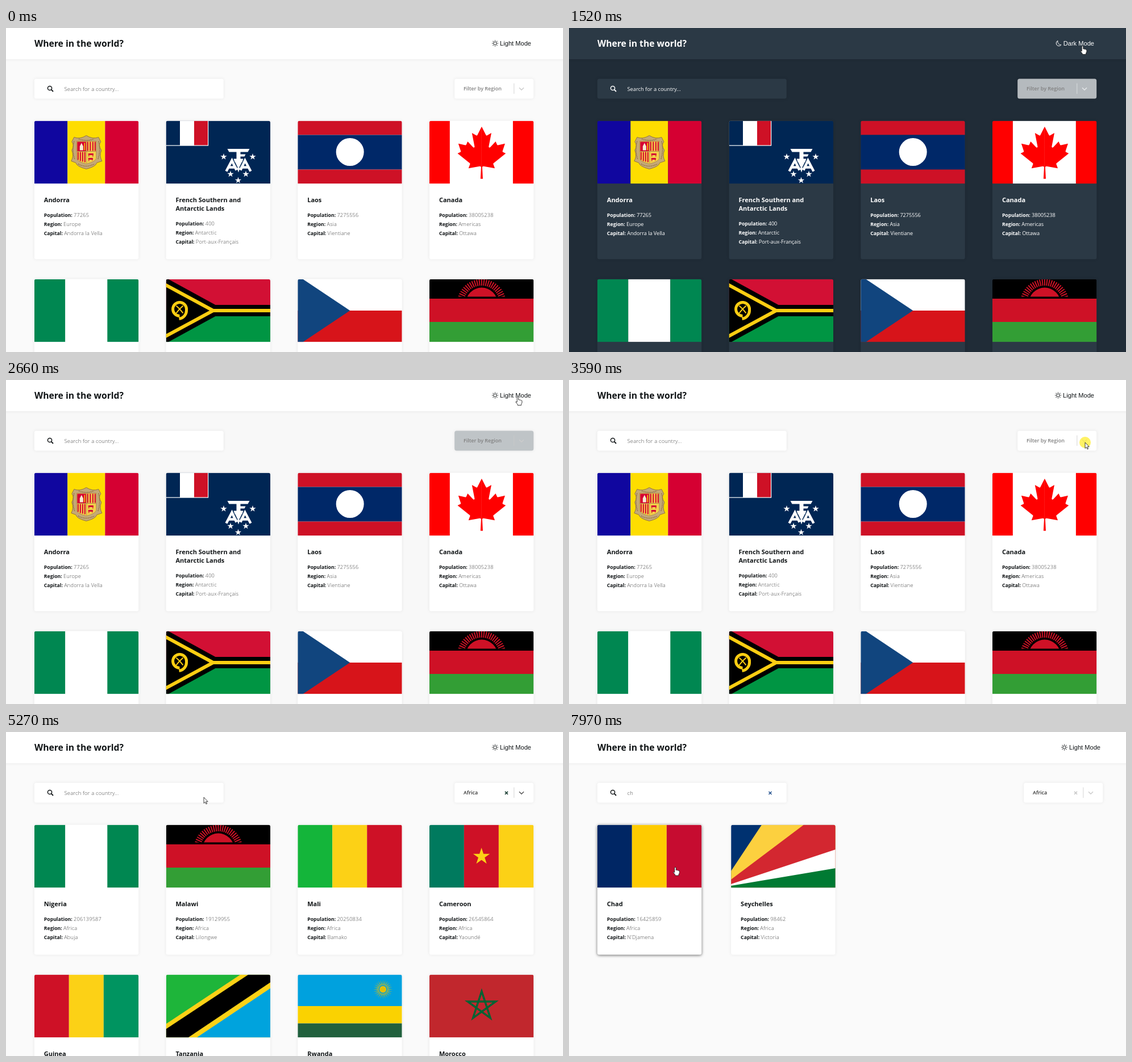
An HTML page that plays this animation: 980 px wide and 571 px high, repeating every 8000 ms.

```html
<!DOCTYPE html>
<html lang="en">
<head>
<meta charset="utf-8">
<title>Where in the world?</title>
<style>
html, body { margin: 0; width: 100%; height: 100%; overflow: hidden; }
svg { display: block; width: 980px; height: 571px; font-family: "Open Sans", "Noto Sans", sans-serif; }
#stage { --bg: #fafafa; --panel: #fff; --ink: #111517; --soft: #484848; --line: #ccc; --glow: rgba(0,0,0,.08); --thin: 300; --gap: .2px; }
#stage.dark { --bg: #202c37; --panel: #2b3945; --ink: #fff; --soft: #fff; --line: #e4e7e9; --glow: rgba(0,0,0,.12); --thin: 400; --gap: -.05px; }
text { fill: var(--ink); white-space: pre; }
.panel { fill: var(--panel); filter: drop-shadow(0 0 2.5px var(--glow)); }
.hover .panel { filter: drop-shadow(0 1px 2.5px rgba(0,0,0,.6)); }
.title { font-size: 15.7px; font-weight: 700; }
.name { font-size: 11px; font-weight: 700; }
.fact { font-size: 8.7px; font-weight: 700; }
.value, .field { font-weight: var(--thin); letter-spacing: var(--gap); fill: var(--soft); }
.value { font-size: 9.2px; }
.field { font-size: 9.4px; }
.mode { font: 11.1px "Liberation Sans", Arial, sans-serif; }
.pick { font-size: 9px; font-weight: 600; }
.stroke { fill: none; stroke: var(--ink); }
</style>
</head>
<body>
<svg id="stage" viewBox="0 0 980 571"></svg>
<script>
const LOOP = 8000, W = 183.5, H = 111;
const stage = document.getElementById('stage');

// Shape helpers
const rect = (x, y, w, h, fill) => `<rect x="${x}" y="${y}" width="${w}" height="${h}" fill="${fill}"/>`;
const disc = (x, y, r, fill) => `<circle cx="${x}" cy="${y}" r="${r}" fill="${fill}"/>`;
const poly = (points, fill) => `<polygon points="${points}" fill="${fill}"/>`;
const path = (d, fill) => `<path d="${d}" fill="${fill}"/>`;
const line = (d, color, width, extra = '') =>
  `<path d="${d}" fill="none" stroke="${color}" stroke-width="${width}" ${extra}/>`;
const times = (n, f) => Array.from({ length: n }, (_, i) => f(i)).join('');
const around = (cx, cy, r, turn) => {
  const a = (turn - .25) * 2 * Math.PI;
  return (cx + r * Math.cos(a)).toFixed(2) + ',' + (cy + r * Math.sin(a)).toFixed(2);
};
const star = (cx, cy, r, fill) =>
  poly(times(10, i => around(cx, cy, i % 2 ? r * .382 : r, i / 10) + ' '), fill);

// Bands take pairs of start and colour
const bands = (wide, ...list) => {
  let out = '';
  for (let i = 0; i < list.length; i += 2) {
    const at = list[i], len = (list[i + 2] ?? (wide ? W : H)) - at;
    out += wide ? rect(at, 0, len, H, list[i + 1]) : rect(0, at, W, len, list[i + 1]);
  }
  return out;
};
const pales = (...l) => bands(true, ...l);
const bars = (...l) => bands(false, ...l);

const unionJack = () => `<svg x="-19" width="111" height="55.5">` + rect(0, 0, 111, 55.5, '#012169') +
  line('M0 0L111 55.5M111 0L0 55.5', '#fff', 11) +
  line('M0 2.5L53 29M58 26.5L111 53M111 -2L58 24.5M53 31L0 57.5', '#c8102e', 3.7) +
  line('M55.5 0V56M0 27.75H111', '#fff', 18) + line('M55.5 0V56M0 27.75H111', '#c8102e', 11) + '</svg>';

const LEAF = 'M0 4430H90l-45-863a95 95 0 0 1 111-98l859 151-116-320a65 65 0 0 1 20-73l941-762-212-99a65 65 0 0 1-34-79l186-572-542 115a65 65 0 0 1-73-38l-105-247-423 454a65 65 0 0 1-111-57l204-1052-327 189a65 65 0 0 1-91-27L0 400Z';

const flags = {
  andorra: () => pales(0, '#10069f', 58.5, '#fedd00', 124.5, '#d50032') +
    `<g stroke="#8c6d3f" stroke-width=".9">` +
    path('M70 29Q80 33 91.5 26Q103 33 113 29L117 37Q112 43 118 52Q114 62 119 71L110 74Q108 81 91.5 85Q75 81 73 74L65 71Q70 62 66 52Q71 43 66 37Z', '#c5a976') + '</g>' +
    line('M70 36Q66 52 71 68M113 36Q117 52 112 68M77 76Q91 84 106 76M78 32Q92 37 105 32', '#94754a', 1.6, 'stroke-dasharray="2 1"') +
    path('M74.5 36H109V66Q108 72 91.7 76Q75 72 74.5 66Z', '#f3d04a') +
    rect(75.5, 37, 15.5, 16.5, '#d50032') + path('M80 52V45L83 39L86 45V52Z', '#f6ead0') + line('M88.5 39V52', '#fedd00', 1.5) +
    line('M94 37V53M98.5 37V53M103 37V53M107 37V53M77 55V69M81 55V71M85 55V72M89 55V73', '#d50032', 2) +
    line('M95 59H104M95 67H103', '#d50032', 3) + line('M96 60V63M103 60V63M96 68V71M102 68V70', '#d50032', 1.2) +
    line('M74.5 36H109V66Q108 72 91.7 76Q75 72 74.5 66ZM92 36V75M75 54H109', '#a8804c', .8),
  southern: () => rect(0, 0, W, H, '#002654') + rect(0, 0, 74.7, 44.2, '#fff') +
    rect(0, 0, 24.5, 43, '#002654') + rect(49.5, 0, 24, 43, '#ce1126') +
    path('M108 49.5H147L144 55H131V59H140L138 63H131V70H124V55H111Z', '#fff') +
    line('M106 89L116 70L124 87M149 89L139 70L131 87M110 82H121M134 82H145', '#fff', 4.4) +
    poly('119,67 136,67 127.5,91', '#fff') + line('M121 73L126 83M134 73L129 83', '#002654', 1.2) +
    [[101.5, 63.5], [152.5, 63.5], [113.5, 94], [140.5, 94], [127, 105]].map(p => star(...p, 6, '#fff')).join(''),
  laos: () => bars(0, '#ce1126', 25, '#002868', 86, '#ce1126') + disc(92, 55, 24.5, '#fff'),
  canada: () => pales(0, '#f00', 36, '#fff', 147, '#f00') +
    [1, -1].map(s => `<path d="${LEAF}" fill="#f00" transform="translate(92 1.2) scale(${s * .0228} .0228)"/>`).join(''),
  nigeria: () => pales(0, '#008751', 54.5, '#fff', 128.5, '#008751'),
  vanuatu: () => bars(0, '#d21034', 55.5, '#009543') +
    poly('0,0 4,0 87,45.5 184,45.5 184,65.5 87,65.5 4,111 0,111', '#000') +
    line('M-4 8.5L83 55.5L-4 102.5M83 55.5H184', '#fdce12', 6) +
    line('M23 70A15 15 0 0 0 36 54A12 12 0 1 0 24 65', '#fdce12', 5) +
    line('M18 47Q24 52 30 60M30 47Q24 52 18 60', '#fdce12', 2),
  czechia: () => bars(0, '#fff', 55.5, '#d7141a') + poly('0,0 9,0 92,55.5 9,111 0,111', '#11457e'),
  malawi: () => bars(0, '#000', 34.5, '#ce1126', 75.5, '#339e35') +
    `<svg width="${W}" height="31">` + disc(92, 43, 28, '#ce1126') +
    times(61, i => line(`M${around(92, 43, 31.5, i / 60 - .5)}L${around(92, 43, 43, i / 60 - .5)}`, '#ce1126', 2)) + '</svg>',
  mali: () => pales(0, '#14b53a', 61, '#fcd116', 122, '#ce1126'),
  cameroon: () => pales(0, '#007a5e', 61, '#ce1126', 122, '#fcd116') + star(91.7, 56, 15.5, '#fcd116'),
  guinea: () => pales(0, '#ce1126', 61, '#fcd116', 122, '#009460'),
  tanzania: () => rect(0, 0, W, H, '#1eb53a') + poly('0,87 131,0 184,0 184,111 0,111', '#fcd116') +
    poly('0,96 145,0 184,0 184,13.5 39,111 0,111', '#000') + poly('54,111 184,24 184,111', '#00a3dd'),
  rwanda: () => bars(0, '#00a1de', 55.5, '#fad201', 86, '#20603d') +
    times(24, i => poly([around(150, 26, 7, i / 24 - .016), around(150, 26, 17, i / 24), around(150, 26, 7, i / 24 + .016)].join(' '), '#e5be01')) +
    disc(150, 26, 7.5, '#00a1de') + disc(150, 26, 6, '#e5be01'),
  morocco: () => rect(0, 0, W, H, '#c1272d') +
    `<polygon points="${times(5, i => around(92, 55.5, 26, i * .4) + ' ')}" fill="none" stroke="#006233" stroke-width="3.4"/>`,
  helena: () => rect(0, 0, W, H, '#012169') + unionJack() +
    path('M129 32Q148 29 166 32V58Q165 73 147.5 80Q130 73 129 58Z', '#c9b77c') +
    path('M130.5 47H164.5V58Q163 72 147.5 78Q132 72 130.5 58Z', '#2c8db5') +
    path('M130.5 47L138 56L137 73Q131 68 130.5 58Z', '#b08d57') +
    path('M143 66H162L158 71H147Z', '#4e3b24') + line('M147 66V52M153 66V50M159 66V54', '#e9e4d2', 2) +
    path('M141 42Q146 36 152 38L155 34L154 40Q150 45 144 44Z', '#fff') + line('M141 42L150 41M149 44V47', '#222', 1.2),
  ocean: () => rect(0, 0, W, H, '#fff') +
    times(6, i => line(`M-28 ${11 + i * 18.4}q15 -10 30 0${times(4, () => 't30 0t30 0')}`, '#012169', 9.2)) + unionJack() +
    line('M148 25Q145 65 147 109', '#8a5a2b', 4) + line('M148 25Q145 65 147 109', '#c49a55', 1.5) +
    times(12, i => {
      const [x, y] = around(148, 28, 25, (i - 5.5) / 16).split(',');
      return line(`M148 27Q${(+x + 148) / 2} ${y - 8} ${x} ${+y + 4}`, '#00752f', 5);
    }) +
    path('M137 82H157L160 70Q153 64 147 70Q140 64 134 70Z', '#c8102e') +
    line('M137 83H158M137 80L134 70Q140 64 147 70Q154 64 160 70L157 80M147 64V82', '#f4c430', 2.2) +
    line('M138 85H157', '#fff', 2),
  tome: () => bars(0, '#009739', 31, '#ffcf00', 79, '#009739') + poly('0,20 35,55.5 0,91', '#ef3340') +
    star(91, 57, 18.5, '#000') + star(147, 57, 18.5, '#000'),
  verde: () => bars(0, '#003893', 55.5, '#fff', 65, '#cf2027', 74.5, '#fff', 84, '#003893') +
    times(10, i => star(...around(68, 69, 28.5, i / 10).split(',').map(Number), 5, '#fcd116')),
  chad: () => pales(0, '#002664', 61, '#fecb00', 122, '#c60c30'),
  ivory: () => pales(0, '#f77f00', 61, '#fff', 122, '#009e60'),
  seychelles: () => rect(0, 0, W, H, '#003170') + poly('0,81.5 54,0 184,0 184,111 0,111', '#fcd03f') +
    poly('0,96.5 128,0 184,0 184,111 0,111', '#d32730') + poly('0,104.5 184,43.5 184,111 0,111', '#fff') +
    poly('0,107.5 184,76.5 184,111 0,111', '#007a33')
};

// flag, name lines, population, region, capital
const NIGERIA = ['nigeria', 'Nigeria', 206139587, 'Africa', 'Abuja'];
const MALAWI = ['malawi', 'Malawi', 19129955, 'Africa', 'Lilongwe'];
const CAMEROON = ['cameroon', 'Cameroon', 26545864, 'Africa', 'Yaoundé'];
const MOROCCO = ['morocco', 'Morocco', 36910558, 'Africa', 'Rabat'];
const CHAD = ['chad', 'Chad', 16425859, 'Africa', "N'Djamena"];
const grids = [
  { gap: 231.7, height: 244, cards: [
    ['andorra', 'Andorra', 77265, 'Europe', 'Andorra la Vella'],
    ['southern', 'French Southern and|Antarctic Lands', 400, 'Antarctic', 'Port-aux-Français'],
    ['laos', 'Laos', 7275556, 'Asia', 'Vientiane'],
    ['canada', 'Canada', 38005238, 'Americas', 'Ottawa'],
    NIGERIA, ['vanuatu', 'Vanuatu'], ['czechia', 'Czechia'], MALAWI] },
  { gap: 231.7, height: 229, cards: [
    NIGERIA, MALAWI, ['mali', 'Mali', 20250834, 'Africa', 'Bamako'], CAMEROON,
    ['guinea', 'Guinea'], ['tanzania', 'Tanzania'], ['rwanda', 'Rwanda'], MOROCCO] },
  { gap: 231.7, height: 244, cards: [
    CAMEROON, MOROCCO,
    ['helena', 'Saint Helena, Ascension|and Tristan da Cunha', 53192, 'Africa', 'Jamestown'],
    ['ocean', 'British Indian Ocean|Territory', 3000, 'Africa', 'Diego Garcia'],
    ['tome', 'São Tomé and Príncipe'], ['verde', 'Cape Verde'], CHAD, ['ivory', 'Ivory Coast']] },
  { gap: 235.3, height: 229, cards: [CHAD, ['seychelles', 'Seychelles', 98462, 'Africa', 'Victoria']] }
];

const card = ([flag, name, ...facts], i, { gap, height }) => {
  const names = name.split('|'), top = 154 + names.length * 15;
  const labels = ['Population', 'Region', 'Capital'];
  return `<g class="card" transform="translate(${49.8 + gap * (i % 4)} ${163.5 + (height + 35) * Math.floor(i / 4)})">` +
    `<rect class="panel" width="${W}" height="${height}" rx="3.5"/><g clip-path="url(#top)">${flags[flag]()}</g>` +
    names.map((n, k) => `<text class="name" x="17" y="${143.5 + k * 15.2}">${n}</text>`).join('') +
    facts.map((f, k) => `<text class="fact" x="17" y="${top + k * 16.4}">${labels[k]}: <tspan class="value">${f}</tspan></text>`).join('') + '</g>';
};

const CROSS = 'M-2.5 -2.5L2.5 2.5M2.5 -2.5L-2.5 2.5';
const REGIONS = ['Africa', 'Americas', 'Asia', 'Europe', 'Oceania'];
stage.innerHTML = `
<clipPath id="top"><path d="M0 111V3.5Q0 0 3.5 0H180Q183.5 0 183.5 3.5V111Z"/></clipPath>
<rect id="page" width="980" height="571" fill="var(--bg)"/>
<rect class="panel" x="-10" y="-10" width="1000" height="65"/>
<text class="title" x="50" y="32.5">Where in the world?</text>
<rect class="panel" x="49.8" y="89.5" width="333" height="35" rx="3.5"/>
<circle class="stroke" cx="77" cy="106" r="3.6" stroke-width="1.5"/>
<path class="stroke" d="M79.7 108.7L83 112" stroke-width="1.8"/>
<text class="field" id="query" x="102.5" y="110.5"></text>
<path id="caret" d="M0 101V114" stroke="#222"/>
<path id="wipe" d="${CROSS}" transform="translate(354 107.5)" stroke="#1f4e8c" stroke-width="1.5"/>
${grids.map(g => `<g class="grid">${g.cards.map((c, i) => card(c, i, g)).join('')}</g>`).join('')}
<g id="right">
  <g id="sun" class="stroke" transform="translate(860.5 27)"><circle r="2.7"/>${times(8, i => `<path d="M0 -4V-5.5" transform="rotate(${i * 45})"/>`)}</g>
  <path id="moon" class="stroke" d="M860 22.5A4.8 4.8 0 1 0 866 29.5A5.5 5.5 0 0 1 860 22.5Z"/>
  <text class="mode" id="mode" x="924" y="31" text-anchor="end"></text>
  <rect class="panel" id="select" x="789.2" y="89.5" width="139" height="35" rx="3.5"/>
  <text class="pick" id="pick" x="805" y="110"></text>
  <path id="clear" d="${CROSS}" transform="translate(880.5 107.3)" stroke-width="1.7"/>
  <path d="M893.8 97.5V116" stroke="var(--line)" stroke-width=".8"/>
  <path id="arrow" d="M903 105.3L907 109.3L911 105.3" fill="none" stroke-width="1.5"/>
</g>
<g id="menu"><rect class="panel" x="789" y="130" width="139" height="134" rx="3"/>
  <rect id="option" x="789" y="133" width="139" height="25.6" fill="#deebff"/>
  ${REGIONS.map((r, i) => `<text class="pick" x="798" y="${149 + i * 25.6}">${r}</text>`).join('')}</g>
<circle id="press" r="10" fill="#ffee32" fill-opacity=".75"/>
<g id="pointer" stroke="#111" stroke-width=".8" stroke-linejoin="round">
  <path id="plain" fill="#fff" d="M0 0V10.5L2.4 8.3L4 12L5.6 11.3L4 7.7H7.2Z"/>
  <path id="hand" fill="#fff" d="M-1.3 1Q0 -.7 1.3 1V5.5Q2.5 4.5 3.6 6Q4.8 5 5.8 6.5Q7.5 6 7.4 8V10.5L6 13V15H-.3V13.5L-3.6 9.5Q-4 7.5 -1.3 9.5Z"/>
  <path id="beam" fill="none" d="M-2 -6H-.5L0 -5.5L.5 -6H2M0 -5.5V5.5M-2 6H-.5L0 5.5L.5 6H2"/>
</g>`;

const el = id => document.getElementById(id);
const show = (node, on) => { node.style.display = on ? '' : 'none'; };
const within = (t, a, b) => t >= a && t < b;
const gridNodes = [...document.querySelectorAll('.grid')];
const chad = gridNodes[3].firstChild;

// start, end, steps, target x, target y, ease power (negative eases out)
const moves = [
  [270, 580, 5, 963, 208, 1],
  [730, 1280, 8, 903.5, 31.5, -1.5],
  [2050, 2130, 2, 900.5, 29.5, 1],
  [3060, 3510, 7, 908, 110, -1.3],
  [4200, 4350, 3, 862, 146, 1],
  [4575, 5120, 8, 354, 115.5, -1.4],
  [5270, 5660, 6, 249, 107, 1.6],
  [7580, 7970, 6, 187, 238, -1.4]
];
const presses = [[1350, 1430], [2510, 2590], [3590, 3660], [4430, 4500], [5810, 5890]];
const mixes = [[1520, 35], [1600, 70], [1670, 100], [2660, 30], [2740, 0]];

function pointerAt(t) {
  let x = 975, y = 640;
  for (const [a, b, n, tx, ty, p] of moves) {
    if (t < a) break;
    const u = Math.min(1, (Math.floor((t - a) / (b - a) * (n - 1) + 1e-6) + 1) / n);
    const e = p < 0 ? 1 - (1 - u) ** -p : u ** p;
    x += (tx - x) * e;
    y += (ty - y) * e;
  }
  return [x, y];
}

function draw(t) {
  const dark = within(t, 1520, 2660);
  stage.classList.toggle('dark', dark);
  el('page').style.fill = within(t, 2660, 4500) ? '#f8f8f8' : 'var(--bg)';
  show(el('sun'), !dark);
  show(el('moon'), dark);
  el('mode').textContent = dark ? 'Dark Mode' : 'Light Mode';

  const mix = mixes.filter(m => t >= m[0]).pop()?.[1] ?? 0;
  el('select').style.fill = `color-mix(in srgb, #2b3945 ${mix}%, #fff)`;
  const picked = t >= 4500, focused = within(t, 3660, 5810);
  el('pick').textContent = picked ? 'Africa' : 'Filter by Region';
  el('pick').style.fill = picked ? '#333' : '#808080';
  show(el('clear'), picked);
  el('clear').style.stroke = focused ? '#24473c' : '#ccc';
  el('arrow').style.stroke = focused ? '#555' : 'var(--line)';
  show(el('menu'), within(t, 3660, 4500));

  const grid = t < 4500 ? 0 : t < 6730 ? 1 : t < 7280 ? 2 : 3;
  gridNodes.forEach((g, i) => show(g, i === grid));
  el('right').setAttribute('transform', `translate(${grid === 3 ? 11 : 0} 0)`);
  el('query').textContent = ['Search for a country...', 'Search for a country...', 'c', 'ch'][grid];
  show(el('wipe'), grid > 1);
  show(el('caret'), within(t, 5810, 6360) || within(t, 6730, 7810));
  el('caret').setAttribute('transform', `translate(${[0, 103.5, 107.5, 113.5][grid]} 0)`);

  const [x, y] = pointerAt(t);
  const onCard = y > 163 && x < (grid === 3 ? 233 : 928);
  const hand = onCard || (y < 36 && x > 850);
  const beam = within(y, 89, 125) && x < 345;
  show(el('pointer'), t >= 270);
  el('pointer').setAttribute('transform', `translate(${x} ${y})`);
  show(el('hand'), hand);
  show(el('beam'), beam);
  show(el('plain'), !hand && !beam);
  chad.classList.toggle('hover', onCard && grid === 3);
  show(el('press'), presses.some(p => within(t, ...p)));
  el('press').setAttribute('transform', `translate(${x} ${y})`);
}

const start = performance.now();
function tick() {
  draw((performance.now() - start) % LOOP);
  requestAnimationFrame(tick);
}
tick();
</script>
</body>
</html>
```
